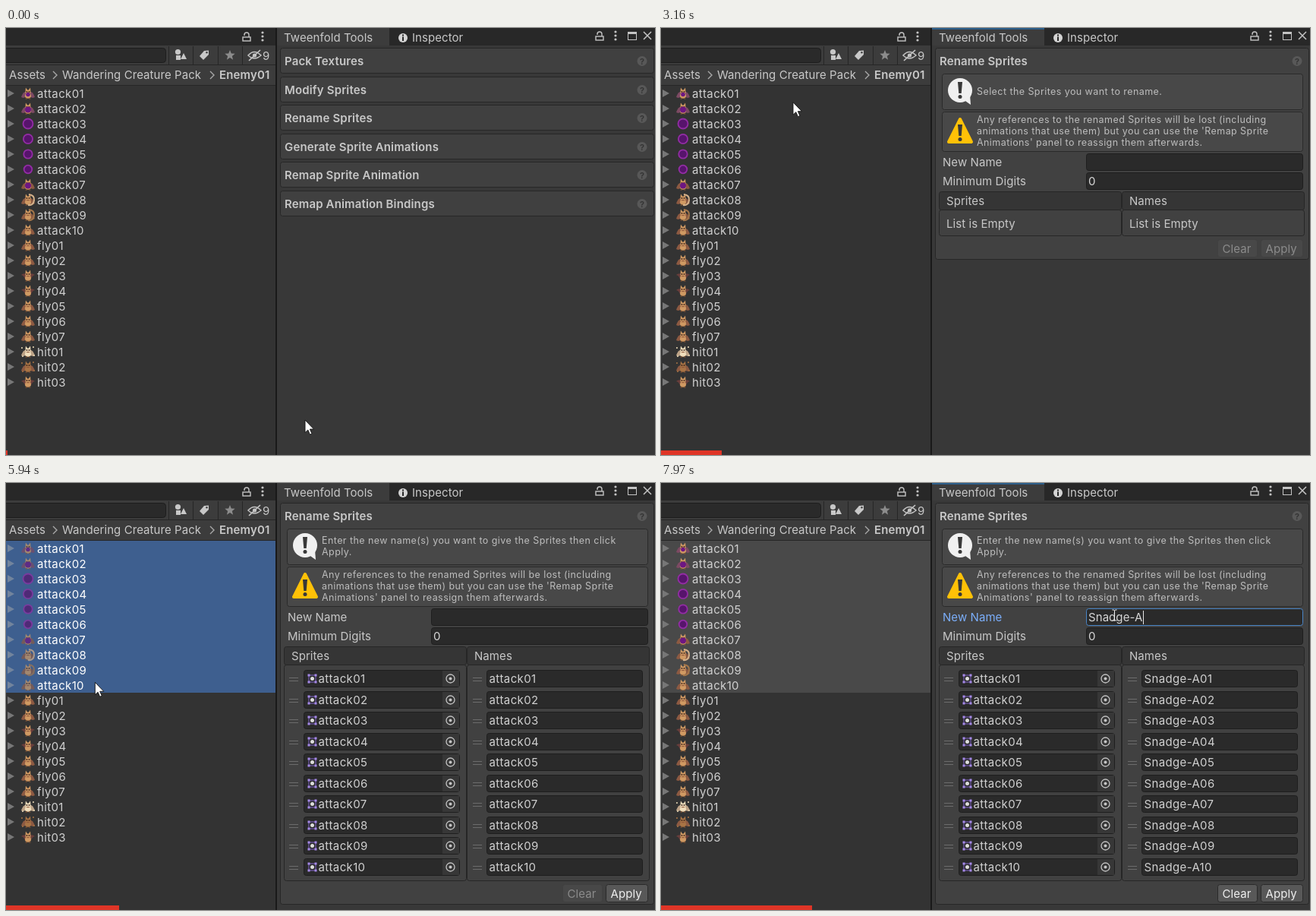
An HTML page for the animation above (8 s loop, 855 px wide and 562 px high).

```html
<!DOCTYPE html>
<html lang="en">
<head>
<meta charset="utf-8">
<title>Rename sprites</title>
<style>
html, body { margin: 0; width: 100%; height: 100%; overflow: hidden; background: #383838; }
svg { display: block; }
text { font: 15px Inter, sans-serif; letter-spacing: .07px; fill: #c8c8c8; white-space: pre; }
.bold { font-weight: 600; letter-spacing: .15px; }
.item { letter-spacing: .35px; fill: #d0d0d0; }
.on { fill: #fff; }
.small { font-size: 12.5px; letter-spacing: .43px; fill: #bdbdbd; }
.value { fill: #d6d6d6; }
</style>
</head>
<body>
<svg id="stage" width="855" height="562" viewBox="0 0 855 562">
  <g id="chrome"></g><g id="files"></g><g id="tools"></g><g id="overlay"></g>
</svg>
<script>
const LOOP = 8000;
const NAME = 'Snadge-A';
const TOP = 26;
const HEADERS = ['Pack Textures', 'Modify Sprites', 'Rename Sprites', 'Generate Sprite Animations',
  'Remap Sprite Animation', 'Remap Animation Bindings'];
const CLICKS = [[1340, 1500], [3560, 3740], [5040, 5220], [6960, 7120]];
// start, end, x, y, vertical bend
const MOVES = [[100, 1000, 484, 115, 0], [2560, 3400, 98, 88, 7], [4000, 4800, 97, 266, 0], [5850, 6600, 597, 174, 0]];

const pad = n => String(n).padStart(2, '0');
const series = (name, count) => Array.from({ length: count }, (_, i) => name + pad(i + 1));
const FILES = [...series('attack', 10), ...series('fly', 7), ...series('hit', 3)];

const clamp = v => Math.max(0, Math.min(1, v));
const smooth = p => p * p * (3 - 2 * p);
const rect = (x, y, w, h, fill, more = '') => `<rect x="${x}" y="${y}" width="${w}" height="${h}" fill="${fill}" ${more}/>`;
const frame = (x, y, w, h, fill, stroke, r = 3) => rect(x + .5, y + .5, w - 1, h - 1, fill, `stroke="${stroke}" rx="${r}"`);
const path = (d, fill, more = '') => `<path d="${d}" fill="${fill}" ${more}/>`;
const line = (d, stroke, w = 1) => path(d, 'none', `stroke="${stroke}" stroke-width="${w}"`);
const dot = (x, y, r, fill, more = '') => `<circle cx="${x}" cy="${y}" r="${r}" fill="${fill}" ${more}/>`;
const text = (x, y, s, cls = '', more = '') => `<text x="${x}" y="${y}" class="${cls}" ${more}>${s}</text>`;
const at = (x, y, inner) => `<g transform="translate(${x} ${y})">${inner}</g>`;
const clip = (y, h, inner) => `<svg y="${y}" width="855" height="${Math.max(h, 0)}">${inner}</svg>`;

const lastDrawn = {};
function draw(id, markup) {
  if (lastDrawn[id] === markup) return;
  lastDrawn[id] = markup;
  document.getElementById(id).innerHTML = markup;
}

function lock(x, y) {
  return rect(x - 5, y, 10, 5, 'none', 'stroke="#c4c4c4" stroke-width="1.4"') +
    line(`M${x - 3} ${y - 2}V${y - 3}Q${x - 3} ${y - 6} ${x} ${y - 6}T${x + 3} ${y - 3}V${y}`, '#c4c4c4', 1.4);
}
const dots = (x, y) => [-5, 0, 5].map(d => dot(x, y + d, 1.6, '#c4c4c4')).join('');

function chrome() {
  const star = Array.from({ length: 10 }, (_, i) => {
    const a = i * Math.PI / 5 - Math.PI / 2, r = i % 2 ? 3 : 7;
    return `${(295 + r * Math.cos(a)).toFixed(1)} ${(36 + r * Math.sin(a)).toFixed(1)}`;
  }).join('L');
  return rect(0, 0, 355, 562, '#333') + rect(0, 0, 855, 23, '#282828') +
    rect(0, 23, 355, 53, '#3c3c3c') + rect(0, 48, 355, 1, '#262626') + rect(0, 75, 355, 1, '#262626') +
    frame(-8, 26, 219, 20, '#2a2a2a', '#1d1d1d', 4) +
    [214, 246, 279, 311].map(x => rect(x, 24, 1, 24, '#262626')).join('') +
    lock(317, 12) + dots(338, 11) +
    dot(226.5, 31.5, 3.6, '#c8c8c8') + rect(224, 36, 6, 6, '#c8c8c8') + path('M230 41L234 33L238 41Z', '#c8c8c8') +
    path('M255 37L261 30L267 29.5L267 35L260 42Z', '#c8c8c8') + dot(264.5, 32.3, 1.2, '#3c3c3c') +
    path(`M${star}Z`, '#8c8c8c') +
    line('M319 36Q327 27 336 36Q327 44 319 36Z', '#c4c4c4', 1.5) + dot(327.5, 36, 2.6, '#c4c4c4') +
    line('M335 29L320 43', '#c4c4c4', 1.7) + text(338, 41.5, '9') +
    text(4, 67, 'Assets') + text(74, 67, 'Wandering Creature Pack') + text(281, 67, 'Enemy01', 'bold') +
    [62, 269].map(x => line(`M${x} 57L${x + 5} 62L${x} 67`, '#a8a8a8', 1.4)).join('') +
    rect(355, 0, 2, 562, '#191919') + rect(357, 23, 498, 539, '#383838') + rect(357, 0, 148, 23, '#3c3c3c') +
    text(366, 18, 'Tweenfold Tools') + text(535, 18, 'Inspector') +
    dot(523, 13, 6, '#d4d4d4') + rect(522, 8.5, 2, 2, '#282828') + rect(522, 11.5, 2, 5.5, '#282828') +
    lock(782, 11) + dots(803, 10) +
    rect(819.5, 5.5, 11, 10, 'none', 'stroke="#c4c4c4"') + rect(819, 5, 12, 3, '#c4c4c4') +
    line('M840 5L850 15M850 5L840 15', '#c4c4c4', 1.5);
}

function creature(kind, n) {
  const pale = kind === 'hit' && n === 1, dim = kind === 'hit' && n === 2;
  const raised = kind === 'fly' && (n === 3 || n === 4) || kind === 'hit' && n === 3;
  const skin = pale ? '#f1dfbd' : dim ? '#a87445' : '#d09a63';
  const wing = pale ? '#bda387' : kind === 'attack' && n < 3 ? '#7d4a63' : raised ? '#6b3f3c' : '#8d5a42';
  const tip = raised ? -1 : 5;
  const side = s => path(`M${s} -2Q${6 * s} -4 ${9 * s} ${tip}L${6.5 * s} ${tip + 1}L${3 * s} 5Z`, wing) +
    path(`M${.5 * s} -4L${3 * s} -7.5L${3.5 * s} -3Z`, skin);
  let art = side(-1) + side(1) + `<ellipse cy="-1.5" rx="3.5" ry="3" fill="${skin}"/>` +
    `<ellipse cy="3" rx="4" ry="3.8" fill="${skin}"/>` +
    [-1, 1].map(s => dot(1.5 * s, -2, .9, '#3a211b') + path(`M${s} 5.5L${4 * s} 7.5H${s}Z`, '#8c5936')).join('') +
    line('M-2 .7H2', '#8a5238');
  if (kind === 'attack' && [1, 2, 7].includes(n)) art += dot(0, 1.5, n === 1 ? 2.8 : 4, '#6d1682');
  if (kind === 'attack' && (n === 8 || n === 9)) art += line('M1 -7Q9 -6 8 1T0 7', n === 8 ? '#d6b28b' : '#a4764a', 2);
  if (kind === 'hit' && n < 3) art += [[-8, -5], [7, -6], [-7, 6], [8, 5]].map(p => dot(...p, 1, skin)).join('');
  return art;
}

function icon(name) {
  const kind = name.slice(0, -2), n = +name.slice(-2);
  if (kind === 'attack' && n > 2 && n < 7)
    return dot(0, 0, 6.5 - (n - 3) * .4, '#57146c', 'stroke="#932da5" stroke-width="1.8"');
  return creature(kind, n);
}

function files(selected, active) {
  const back = active ? '#3e5f8f' : '#494949';
  return (selected ? rect(0, 76, 355, 20 * selected, back) : '') + FILES.map((name, i) => {
    const y = 86 + 20 * i, on = i < selected;
    return path(`M2 ${y - 5}L11 ${y}L2 ${y + 5}Z`, on && active ? '#72849d' : '#777') + at(29, y, icon(name)) +
      (on && active ? rect(19, y - 10, 19, 20, back, 'opacity=".3"') : '') +
      text(41, y + 6, name, on && active ? 'item on' : 'item');
  }).join('');
}

const help = y => dot(838, y, 6.5, '#585858') + text(838, y + 4, '?', '', 'text-anchor="middle" style="font-size:11px;font-weight:600;fill:#333"');
const header = (i, y, k) => frame(361, Math.round(y), 493, Math.max(Math.round(34 * k), 2), '#404040', '#272727') +
  clip(Math.round(y), 34 * k, text(367, 23, HEADERS[i], 'bold') + help(17.5));

const button = (x, w, y, label, on) => frame(x, y, w, 24, on ? '#585858' : '#484848', on ? '#2b2b2b' : '#404040') +
  text(x + 6.5, y + 18, label, '', `style="fill:${on ? '#eee' : '#8b8b8b'}"`);
const field = (x, y, w, stroke = '#1e1e1e') => frame(x, y, w, 23, '#2a2a2a', stroke);
const grip = (x, y) => rect(x, y - 2, 12, 1, '#6c6c6c') + rect(x, y + 2, 12, 1, '#6c6c6c');

function row(i, typed) {
  const y = Math.round(258 + 27.5 * i), num = pad(i + 1);
  const corners = [[-6, -6], [3, -6], [-6, 3], [3, 3]].map(([a, b]) => rect(403.5 + a, y - .5 + b, 3, 3, '#a58ae8')).join('');
  return grip(373, y) + field(392, y - 12, 206) + rect(575, y - 11, 22, 21, '#373737') +
    rect(399, y - 5, 9, 9, 'none', 'stroke="#8064c6"') + corners + dot(403.5, y - .5, 2.5, '#ddd') +
    text(411.5, y + 5, 'attack' + num, 'item') +
    dot(585.5, y - .5, 5.5, 'none', 'stroke="#c4c4c4" stroke-width="1.3"') + dot(585.5, y - .5, 2, '#c4c4c4') +
    grip(615, y) + field(633, y - 12, 206) + text(636.5, y + 5, (typed || 'attack') + num, 'item');
}

const tableBottom = rows => rows ? Math.floor(249.5 + 27.5 * rows) : 274;

function renameForm(s) {
  const bottom = tableBottom(s.rows);
  const mark = y => path(`M391 ${y - 11}H397L395.7 ${y + 4}H392.3Z`, '#383838') + dot(394, y + 8.5, 2.5, '#383838');
  const lines = (y, list) => list.map((l, i) => text(416, y + 15 * i, l, 'small')).join('');
  const info = s.rows ? lines(80, ['Enter the new name(s) you want to give the Sprites then click', 'Apply.'])
    : lines(88, ['Select the Sprites you want to rename.']);
  const column = (x, w, title) => frame(x, 239, w, bottom - 239, '#414141', '#262626') +
    frame(x, 215, w, 25, '#353535', '#262626') + text(x + 10, 233, title);
  const body = s.rows ? Array.from({ length: s.rows }, (_, i) => row(i, s.typed)).join('')
    : text(376, 263, 'List is Empty') + text(617, 263, 'List is Empty');
  return text(367, 49, HEADERS[2], 'bold') + help(43.5) +
    frame(370, 60, 476, 48, '#484848', '#2a2a2a') + dot(394, 82, 16, '#f0f0f0') + path('M398 94L408 101L407 88Z', '#f0f0f0') + mark(82) + info +
    frame(370, 110, 476, 53, '#484848', '#2a2a2a') +
    path('M394 120L409 150H379Z', '#ffc107', 'stroke="#ffc107" stroke-width="4" stroke-linejoin="round"') + mark(138) +
    lines(125, ['Any references to the renamed Sprites will be lost (including',
      "animations that use them) but you can use the 'Remap Sprite", "Animations' panel to reassign them afterwards."]) +
    text(371, 182, 'New Name', '', s.editing ? 'style="fill:#7baefa"' : '') +
    field(560, 165, 286, s.editing ? '#4a87c9' : s.hover ? '#6c6c6c' : '#1e1e1e') +
    text(563, 182, s.typed, 'value', 'id="typed"') +
    text(371, 207, 'Minimum Digits') + field(560, 190, 286) + text(563, 207, '0', 'value') +
    column(366, 241, 'Sprites') + column(607, 241, 'Names') + body +
    button(733, 53, bottom + 4, 'Clear', s.typed) + button(790, 56, bottom + 4, 'Apply', s.rows);
}

function tools(s) {
  const { k } = s, step = 37.5 * k, top = Math.round(TOP + 2 * step);
  const full = tableBottom(s.rows) + 31 - TOP;
  const h = Math.round(34 + (full - 34) * (1 - k ** 1.6));
  let out = s.focus ? rect(357, 0, 148, 2, '#2c5d87') : '';
  if (k > 0) {
    for (const i of [0, 1]) out += header(i, TOP + step * i, k);
    for (const i of [3, 4, 5]) out += header(i, TOP + 2 * step + h + 3.5 + step * (i - 3), k);
  }
  if (k === 1) return out + header(2, top, 1);
  return out + frame(361, top, 493, h, '#414141', '#272727') +
    clip(top, h - 3, at(0, -TOP, renameForm(s)));
}

function pointer(t) {
  let x = 394, y = 516;
  for (const [from, to, nx, ny, bend] of MOVES) {
    const e = smooth(clamp((t - from) / (to - from)));
    x += (nx - x) * e;
    y += (ny - y) * e + bend * 4 * e * (1 - e);
  }
  return [x, y];
}

function overlay(t, x, y, beam, caret) {
  const arrow = path('M0 0V16.5L3.8 13L6.4 19L9 17.9L6.4 12H11.5Z', '#fff', 'stroke="#111" stroke-width=".9"');
  const ibeam = line('M-2.5 -7H-.5L.5 -6L1.5 -7H3.5M.5 -6V6M-2.5 7H-.5L.5 6L1.5 7H3.5', '#eee');
  const pressed = CLICKS.some(([a, b]) => t >= a && t < b);
  return rect(0, 556, Math.round(2 + t * .0247), 6, '#df3527') +
    (caret ? rect(caret, 168, 1, 18, '#e6e6e6') : '') + at(x.toFixed(1), y.toFixed(1), beam ? ibeam : arrow) +
    (pressed ? dot(x, y + 1, 15, '#ebd700', 'opacity=".6"') : '');
}

function render(t) {
  const [x, y] = pointer(t);
  const hover = x > 560 && y < 188 && t > 5850;
  const editing = t >= 6960;
  const typed = NAME.slice(0, Math.max(0, Math.floor((t - 7200) / 100) + 1));
  const selected = t < 3560 ? 0 : t < 5040 ? 1 : 10;
  const rows = t < 3600 ? 0 : t < 5260 ? 1 : 10;
  const k = (1 - clamp((t - 1490) / 500)) ** 4;
  draw('files', files(selected, !editing));
  draw('tools', tools({ k, rows, typed, editing, hover, focus: editing || (t >= 1340 && t < 3560) }));
  const caret = editing && Math.round(563.5 + (typed ? document.getElementById('typed').getComputedTextLength() : 0));
  draw('overlay', overlay(t, x, y, hover, caret));
}

draw('chrome', chrome());
const start = performance.now();
function tick() {
  render((performance.now() - start) % LOOP);
  requestAnimationFrame(tick);
}
tick();
</script>
</body>
</html>
```
